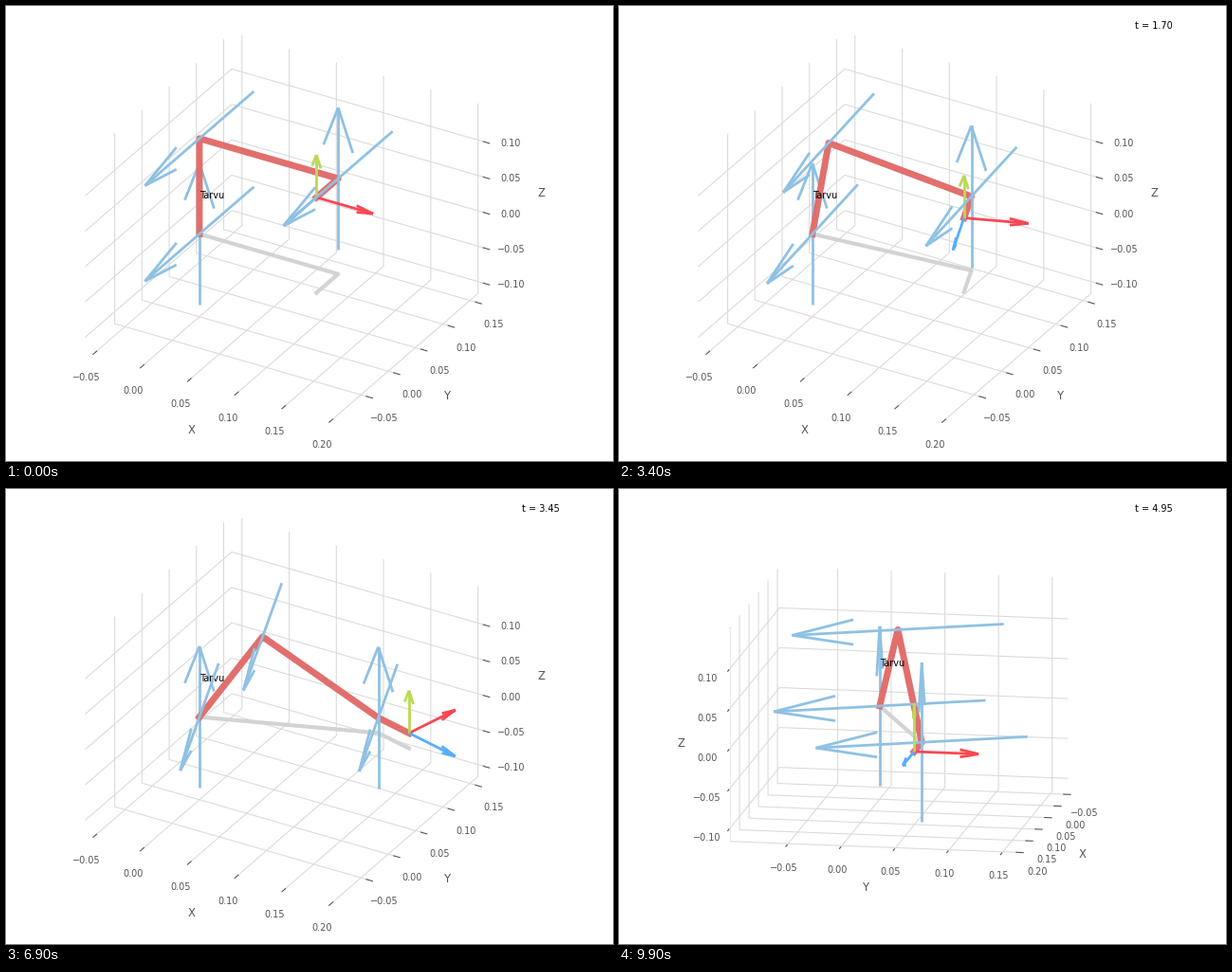
Write a matplotlib script that moves like this. It is 640 by 480 pixels and loops after 10000 ms.

```python
import numpy as np
import matplotlib.pyplot as plt
from matplotlib.animation import FuncAnimation

FRAMES, INTERVAL = 100, 100
DT = 0.05

plt.rcParams.update({
    "font.family": "DejaVu Sans",
    "font.size": 7,
    "axes.labelsize": "large",
    "axes.labelcolor": "#555555",
    "axes.edgecolor": "white",
    "axes.linewidth": 1,
    "axes.axisbelow": True,
    "xtick.color": "#555555",
    "ytick.color": "#555555",
    "grid.color": "#dbdbdb",
    "grid.linestyle": "-",
    "axes3d.xaxis.panecolor": (1, 1, 1, 1),
    "axes3d.yaxis.panecolor": (1, 1, 1, 1),
    "axes3d.zaxis.panecolor": (1, 1, 1, 1),
})

# Arm geometry in metres, joint goals in radians
UPPER, FORE, TOOL = 0.135, 0.147, 0.0399
AXIS_LEN, TOOL_AXIS = 0.2, 0.06
PAN, SHOULDER, FORE_DROP, TOOL_YAW = 0.416, 0.542, 0.897, np.pi / 2
UP = np.array([0.0, 0.0, 1.0])

# Camera drag: frame, azimuth, elevation
VIEW_KEYS = np.array([
    (70, -60, 30),
    (77, -13, 24),
    (85, -4, 23.4),
    (88, 2, 23),
    (99, 10, 12.5),
])

fig = plt.figure(figsize=(6.4, 4.8), dpi=100)
ax = fig.add_subplot(projection="3d", proj_type="ortho")
fig.subplots_adjust(left=-0.09, bottom=0, right=0.99, top=1)

HALF = 0.1344
ax.set(xlabel="X", ylabel="Y", zlabel="Z",
       xlim=(0.0735 - HALF, 0.0735 + HALF),
       ylim=(0.0303 - HALF, 0.0303 + HALF),
       zlim=(0.0175 - HALF, 0.0175 + HALF))
ax.set_xticks(np.arange(-1, 5) * 0.05)
ax.set_yticks(np.arange(-1, 4) * 0.05)
ax.set_zticks(np.arange(-2, 3) * 0.05)

shadow, = ax.plot([], [], [], color="lightgrey", linewidth=3)
arm, = ax.plot([], [], [], color="#E16F6D", linewidth=5)
ax.text(0, 0, 0.05, "Tarvu")
timer = fig.text(0.85, 0.95, "")
arrows = []


def quintic(u):
    return u**3 * (10 - 15 * u + 6 * u * u)


def arrow(start, vec, color):
    arrows.append(ax.quiver(*start, *vec, color=color, linewidth=2,
                            arrow_length_ratio=0.3))


def joint_axis(pos, direction):
    arrow(pos - direction * AXIS_LEN / 2, direction * AXIS_LEN, "#8FC1E2")


def pose(s):
    """Joint positions, hinge direction and tool directions at progress s."""
    pan, lift, drop, yaw = s * np.array([PAN, SHOULDER, FORE_DROP, TOOL_YAW])
    out = np.array([np.cos(pan), np.sin(pan), 0])
    hinge = np.array([np.sin(pan), -np.cos(pan), 0])
    tool_x = np.array([np.cos(yaw), np.sin(yaw), 0])
    tool_z = np.array([np.sin(yaw), -np.cos(yaw), 0])
    base = np.zeros(3)
    elbow = UPPER * (np.sin(lift) * out + np.cos(lift) * UP)
    wrist = elbow + FORE * (np.cos(drop) * out - np.sin(drop) * UP)
    tip = wrist + TOOL * tool_z
    return np.array([base, elbow, wrist, tip]), hinge, tool_x, tool_z


def update(i):
    points, hinge, tool_x, tool_z = pose(quintic(i / (FRAMES - 1)))
    base, elbow, wrist, tip = points
    x, y, z = points.T
    arm.set_data_3d(x, y, z)
    shadow.set_data_3d(x, y, np.zeros_like(z))

    while arrows:
        arrows.pop().remove()
    arrow(tip, tool_x * TOOL_AXIS, "#F84752")
    arrow(tip, UP * TOOL_AXIS, "#BADA55")
    arrow(tip, tool_z * TOOL_AXIS, "#54AEFF")
    joint_axis(base, UP)
    for pos in (base, elbow, wrist):
        joint_axis(pos, hinge)
    joint_axis(wrist, UP)

    key, azim, elev = VIEW_KEYS.T
    ax.view_init(elev=np.interp(i, key, elev), azim=np.interp(i, key, azim))
    timer.set_text(f"t = {i * DT:.2f}" if i else "")
    return []


anim = FuncAnimation(fig, update, frames=FRAMES, interval=INTERVAL,
                     init_func=lambda: update(0), repeat=True,
                     repeat_delay=0, cache_frame_data=False)
plt.show()
```
